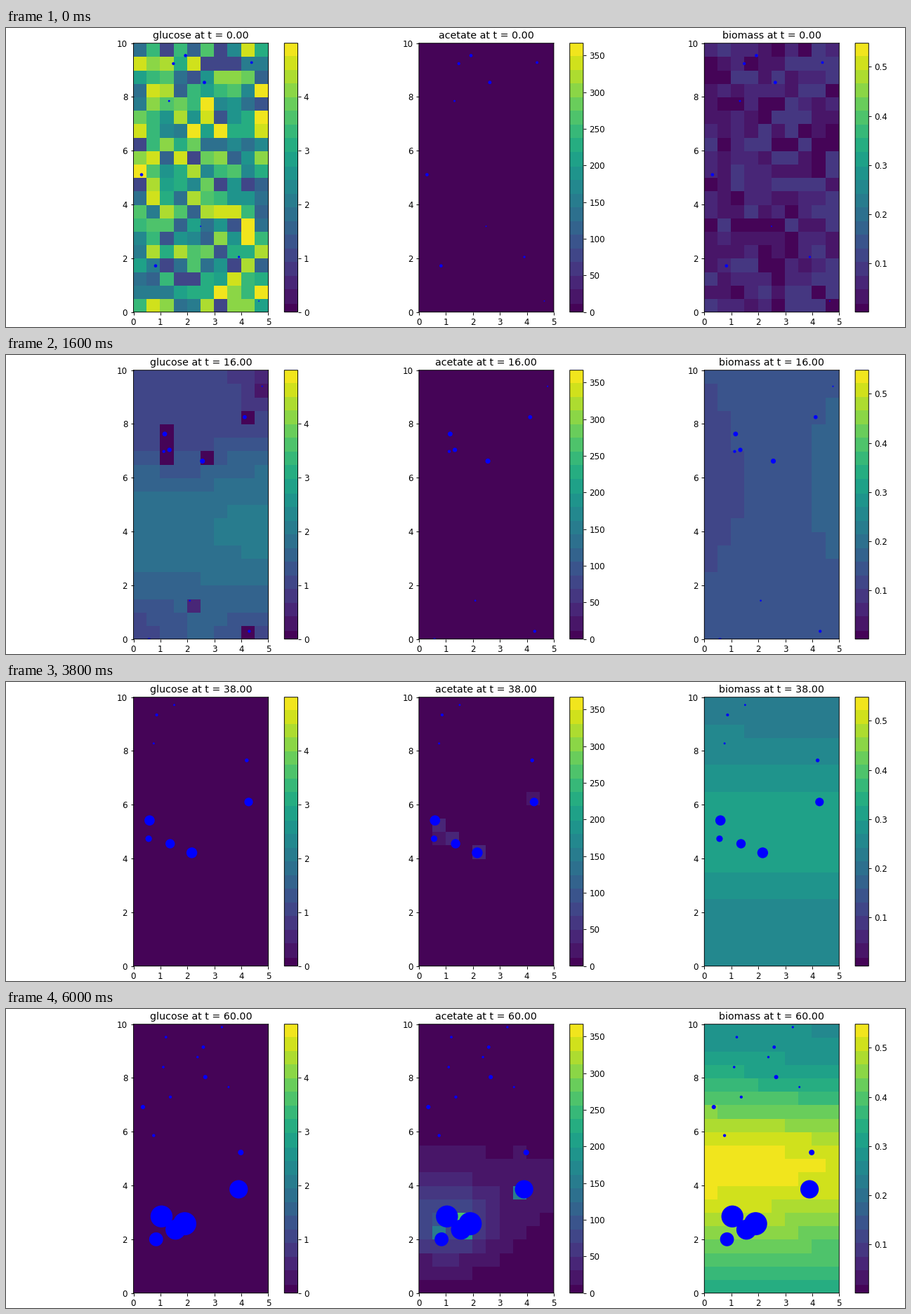
Recreate the animation shown at these times as a matplotlib script. Size 1280x427 px, loop 6.1 s.

```python
import matplotlib.pyplot as plt
import numpy as np
from matplotlib.animation import FuncAnimation
from matplotlib.colors import ListedColormap

W, H, DPI = 1280, 427, 64
FRAMES, INTERVAL = 61, 100
S = 4 / 3  # point scale for this dpi
FALL = 0.11  # sinking speed of drifting cells

plt.rcParams.update({
    "font.family": "DejaVu Sans", "font.size": 10 * S, "path.snap": False,
    "axes.linewidth": 0.8 * S, "axes.titlepad": 6 * S,
})
for side in ("xtick", "ytick"):
    plt.rcParams.update({f"{side}.major.size": 3.5 * S,
                         f"{side}.major.width": 0.8 * S,
                         f"{side}.major.pad": 3.5 * S})

# Cells that stay: start radius, then (x, y) at KEYS
KEYS = [0, 22, 46, 60]
COLONY = [
    (2.30, (1.93, 9.54), (0.87, 6.91), (0.46, 4.67), (1.04, 2.85)),
    (2.42, (2.63, 8.54), (2.53, 5.90), (1.98, 3.37), (1.90, 2.58)),
    (2.10, (1.48, 9.24), (1.28, 6.21), (1.40, 3.72), (1.56, 2.36)),
    (1.45, (1.32, 7.85), (1.05, 6.65), (0.32, 3.78), (0.84, 2.00)),
    (1.92, (4.38, 9.28), (4.03, 7.87), (4.39, 5.22), (3.90, 3.86)),
]

# Cells that pass through: time, x, y, sideways drift, radius
VISITORS = [
    (0, 0.30, 5.11, -0.05, 2.3), (0, 2.49, 3.19, -0.025, 1.0),
    (0, 3.91, 2.05, 0.024, 1.6), (0, 0.82, 1.72, -0.015, 2.3),
    (0, 4.65, 0.41, 0.01, 0.9), (11, 4.77, 9.84, 0.07, 3.3),
    (22, 4.95, 8.74, 0.03, 1.2), (38, 4.20, 7.65, -0.01, 2.7),
    (46, 0.14, 9.32, -0.03, 2.2), (46, 0.75, 7.40, 0.0, 1.7),
]


def newcomers(count=9):
    """Small cells that enter at the top, one after another."""
    rng = np.random.default_rng(3)
    return np.column_stack([
        np.linspace(32, 59, count), rng.uniform(0.7, 4.2, count),
        np.full(count, 10.0), rng.uniform(-0.03, 0.03, count),
        rng.uniform(1, 2.2, count)])


DRIFTERS = np.vstack([VISITORS, newcomers()])


def cells_at(t):
    """Rows of x, y, radius in pixels at time t."""
    growth = np.exp(np.interp(t, [0, 11, 60], [0, 0.22, 1.92]))
    rows = [[np.interp(t, KEYS, axis) for axis in zip(*path)] + [r * growth]
            for r, *path in COLONY]
    t0, x, y, drift, r = DRIFTERS.T
    age = t - t0
    free = np.column_stack([x + drift * age, y - FALL * age, r * np.exp(0.018 * age)])
    return np.vstack([rows, free])


def diffuse(field, rate=0.2, steps=5):
    for _ in range(steps):
        p = np.pad(field, 1, mode="edge")
        around = p[:-2, 1:-1] + p[2:, 1:-1] + p[1:-1, :-2] + p[1:-1, 2:]
        field = field + rate * (around - 4 * field)
    return field


X, Y = np.meshgrid(np.arange(10) / 2 + 0.25, np.arange(20) / 2 + 0.25)


def biomass_trend(t):
    """Rising level with a bulge that grows around the colony."""
    late = max(t - 22, 0)
    level = np.interp(t, [0, 11, 22, 60], [0.05, 0.092, 0.205, 0.281])
    tilt = np.interp(t, [0, 11, 30, 60], [0, 0.014, 0, -0.006])
    mid = 5.4 - 0.015 * late
    width = np.where(Y > mid, 2.3 + 0.012 * late, 2 + 0.042 * late)
    bulge = 0.25 * (late / 38) ** 1.3 * np.exp(-((Y - mid) / width) ** 2)
    lean = 0.0001 * late * (5 - Y)
    return level + lean + bulge + tilt * (X - 2.5) * np.exp(-((Y - 6) / 4) ** 2)


def simulate():
    rng = np.random.default_rng(7)
    glucose = rng.uniform(1, 4.95, X.shape)
    noise = rng.uniform(-0.05, 0.05, X.shape)
    acetate = np.zeros(X.shape)
    history = []
    for t in range(FRAMES):
        cells = cells_at(t)
        if t:
            glucose = diffuse(glucose) * (0.985 if t < 23 else 0.86)
            acetate = np.maximum(diffuse(acetate) - 2, 0)
            noise = diffuse(noise)
            for x, y, r in cells:
                if 0 <= x < 5 and 0 <= y < 10:
                    at = int(y * 2), int(x * 2)
                    glucose[at] = max(0, glucose[at] - 0.5 * r * r)
                    acetate[at] += max(0, 0.72 * r * r - 4)
        history.append((cells, (glucose.copy(), acetate.copy(),
                                biomass_trend(t) + noise)))
    return history


def banded_viridis():
    band = np.clip(np.floor((np.arange(256) - 8) / 13.1) + 1, 0, 19)
    centre = np.clip(8 + 13.1 * (band - 0.5), 2, 251).astype(int)
    return ListedColormap(plt.get_cmap("viridis")(centre))


HISTORY = simulate()
CMAP = banded_viridis()

fig = plt.figure(figsize=(W / DPI, H / DPI), dpi=DPI, facecolor="white")


def pixel_axes(left, width, top=21.7, height=384):
    return fig.add_axes([left / W, 1 - (top + height) / H, width / W, height / H])


def make_panel(column, name, vmin, vmax, ticks):
    left = 181.5 + 406.4 * column
    ax = pixel_axes(left, 192)
    mesh = ax.pcolormesh(np.arange(11) / 2, np.arange(21) / 2, np.zeros((20, 10)),
                         cmap=CMAP, vmin=vmin, vmax=vmax)
    dots = ax.scatter([], [], color="blue", linewidths=0, zorder=2)
    ax.set(xlim=(0, 5), ylim=(0, 10), xticks=range(6), yticks=range(0, 11, 2))
    fig.colorbar(mesh, cax=pixel_axes(left + 214.8, 19.2), ticks=ticks)
    return name, mesh, dots, ax.set_title("")


panels = [
    make_panel(0, "glucose", 0, 4.99, range(5)),
    make_panel(1, "acetate", 0, 367, range(0, 351, 50)),
    make_panel(2, "biomass", 0.001, 0.548, np.arange(1, 6) / 10),
]


def update(t):
    cells, fields = HISTORY[t]
    sizes = (2 * cells[:, 2] * 72 / DPI) ** 2
    for (name, mesh, dots, title), field in zip(panels, fields):
        mesh.set_array(field)
        dots.set_offsets(cells[:, :2])
        dots.set_sizes(sizes)
        title.set_text(f"{name} at t = {t:.2f}")
    return []


anim = FuncAnimation(fig, update, frames=FRAMES, interval=INTERVAL,
                     init_func=lambda: update(0), repeat=True, repeat_delay=0)
plt.show()
```
